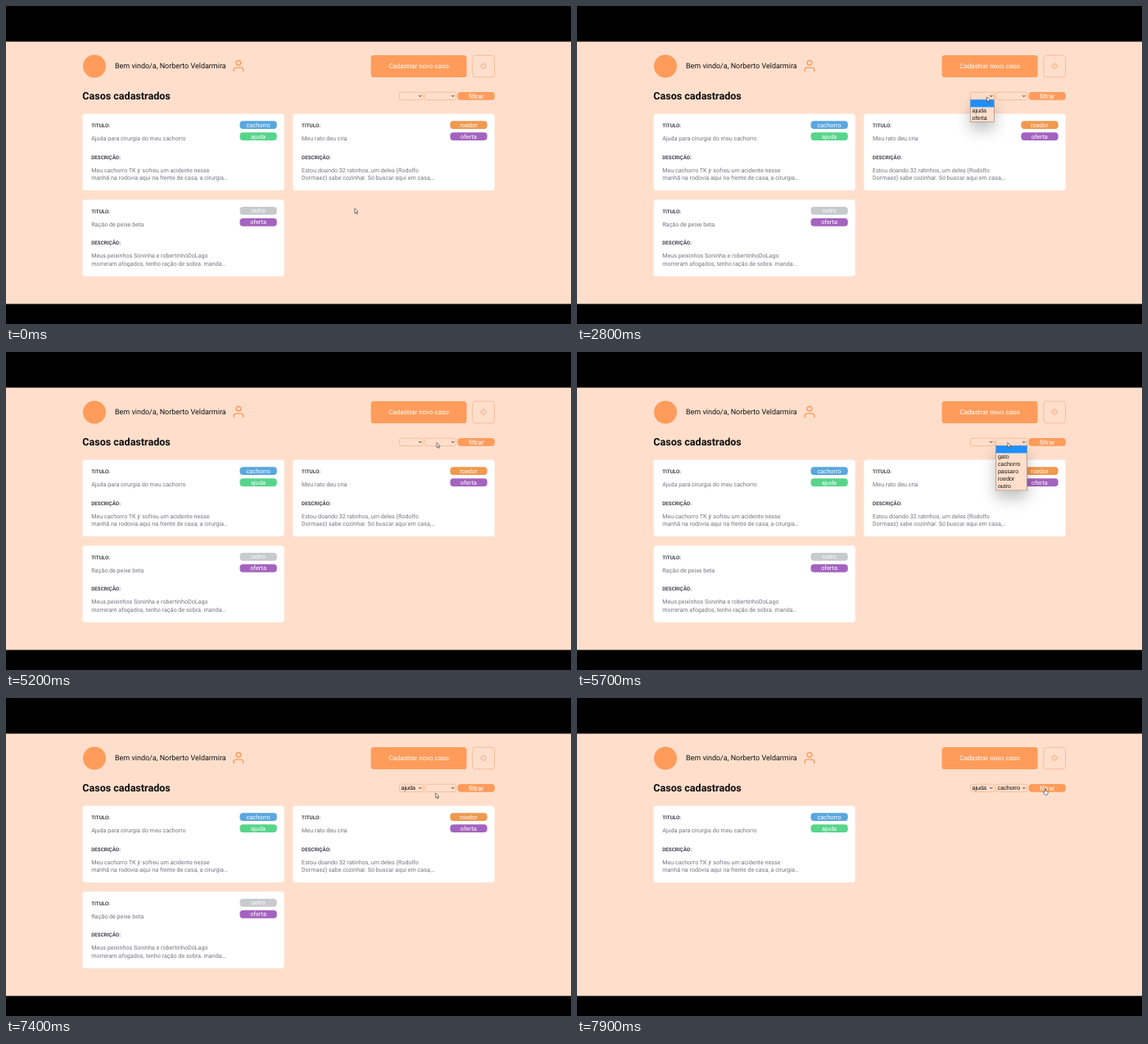
Write an HTML page that moves like this. It is 690 by 388 pixels and loops after 8000 ms.

```html
<!DOCTYPE html>
<html lang="pt-BR">
<head>
<meta charset="utf-8">
<style>
html, body { margin: 0; width: 100%; height: 100%; overflow: hidden; background: #000; }
svg { display: block; width: 100%; height: 100%; }
text { font-family: Roboto, sans-serif; text-rendering: geometricPrecision; }
.ui { font: 7.1px "Liberation Sans", Arial, sans-serif; }
</style>
</head>
<body>
<svg id="stage" viewBox="0 0 690 388">
  <defs>
    <filter id="shadow" x="-150%" y="-80%" width="400%" height="300%">
      <feDropShadow dx="0" dy="9" stdDeviation="9" flood-opacity=".25"/>
    </filter>
  </defs>
</svg>
<script>
const ORANGE = '#ff9c5b', PAGE = '#ffdfcc';
const stage = document.getElementById('stage');
const LOOP = 8000, STEP = 100;

const rect = (x, y, w, h, fill, rx = 0, extra = '') =>
  `<rect x="${x}" y="${y}" width="${w}" height="${h}" rx="${rx}" fill="${fill}" ${extra}/>`;
const text = (x, y, size, fill, str, extra = '') =>
  `<text x="${x}" y="${y}" font-size="${size}" fill="${fill}" ${extra}>${str}</text>`;
const centered = 'text-anchor="middle"';

const tagColors = {
  cachorro: '#5aa7de', ajuda: '#57d58b', roedor: '#f0994f', oferta: '#a463bf', outro: '#c9cacd'
};
const tag = (y, name) =>
  rect(192, y, 45.3, 9.7, tagColors[name], 4) +
  text(214.6, y + 7.4, 7.4, '#fff', name, centered);

const label = (y, str) => text(10.7, y, 6.27, '#41414d', str, 'font-weight="700"');
const body = (y, str) => text(10.7, y, 7.17, '#737380', str);

function card(id, x, y, title, lines, tags) {
  return `<g id="${id}" transform="translate(${x} ${y})">` +
    rect(0, 0, 246.2, 93.5, '#fff', 3.6) +
    label(16.7, 'TITULO:') + body(32.7, title) +
    label(55.1, 'DESCRIÇÃO:') + body(71.1, lines[0]) + body(80.8, lines[1]) +
    tag(8.7, tags[0]) + tag(22.7, tags[1]) + '</g>';
}

function select(id, x, w) {
  return rect(x, 105.2, w, 9.3, PAGE, 2, `stroke="${ORANGE}" stroke-width=".5"`) +
    `<text id="${id}" class="ui" x="${x + 2.1}" y="112.2"></text>` +
    `<path d="M${x + w - 5.4} 109l1.6 1.6 1.6-1.6" fill="none" stroke="#111" stroke-width=".9"/>`;
}

function menu(id, x, w, items) {
  const h = 9.1 * (items.length + 1);
  return `<g id="${id}"><g filter="url(#shadow)">` +
    rect(x, 114.3, w, h, PAGE, 0, 'stroke="#8b7d75" stroke-width=".6"') + '</g>' +
    rect(x + .3, 114.4, w - .6, 9, '#1e90ff', 0, 'class="mark"') +
    items.map((s, i) => `<text class="ui" x="${x + 2.4}" y="${130 + 9 * i}">${s}</text>`).join('') + '</g>';
}

stage.innerHTML += [
  rect(0, 43.5, 690, 320, PAGE),
  `<circle cx="108" cy="73.5" r="14" fill="${ORANGE}"/>`,
  text(133, 76.4, 8.97, '#111', 'Bem vindo/a, Norberto Veldarmira'),
  `<g transform="translate(275.3 64.3) scale(.72)" fill="none" stroke="${ORANGE}" stroke-width="2" stroke-linecap="round">
    <path d="M20 21v-2a4 4 0 0 0-4-4H8a4 4 0 0 0-4 4v2"/><circle cx="12" cy="7" r="4"/></g>`,
  rect(445.6, 60, 117, 27, ORANGE, 3.6),
  text(504, 76, 8.06, '#fff', 'Cadastrar novo caso', centered),
  rect(569.8, 60.2, 26.8, 26.6, 'none', 3.6, 'stroke="#f3ae86" stroke-width=".7"'),
  `<path transform="translate(579 68.6) scale(.34)" d="M18.4 6.6a9 9 0 1 1-12.8 0M12 2v10"
    fill="none" stroke="#ee9560" stroke-width="2.2" stroke-linecap="round"/>`,
  text(93.3, 114.1, 12.54, '#0c0c0c', 'Casos cadastrados', 'font-weight="700"'),
  select('kind', 480.4, 29.2),
  select('animal', 511.6, 38),
  rect(551.5, 105, 45.4, 9.8, ORANGE, 4),
  text(574.2, 112.6, 8, '#fff', 'filtrar', centered),
  card('card1', 93.5, 131.5, 'Ajuda para cirurgia do meu cachorro',
    ['Meu cachorro TK jr sofreu um acidente nesse', 'manhã na rodovia aqui na frente de casa, a cirurgia…'],
    ['cachorro', 'ajuda']),
  card('card2', 350.4, 131.5, 'Meu rato deu cria',
    ['Estou doando 32 ratinhos, um deles (Rodolfo', 'Dormaez) sabe cozinhar. Só buscar aqui em casa,…'],
    ['roedor', 'oferta']),
  card('card3', 93.5, 236.3, 'Ração de peixe beta',
    ['Meus peixinhos Soninha e robertinhoDoLago', 'morreram afogados, tenho ração de sobra. manda…'],
    ['outro', 'oferta']),
  menu('kinds', 480.2, 29.4, ['ajuda', 'oferta']),
  menu('animals', 511.5, 38.2, ['gato', 'cachorro', 'passaro', 'roedor', 'outro']),
  `<g id="cursor" stroke="#333" stroke-width=".65" fill="#fff" stroke-linejoin="round">
    <path id="arrow" d="M0 0v5.8l1.3-1.2 1 2.2 1.1-.5-1-2.1h1.8z"/>
    <path id="hand" d="M-.8 3.8V.5q.7-1 1.4 0v2.2q2.4 0 2.5 1.2v1.7L2.4 7.6H-.6L-2.5 4.8q.2-1 1.7-.2z"/></g>`
].join('');

const $ = id => document.getElementById(id);
const show = (id, on) => $(id).setAttribute('visibility', on ? 'inherit' : 'hidden');
const within = (t, a, b) => t >= a && t < b;

// time, x, y of the pointer tip
const path = [
  [0, 425.8, 247], [100, 444, 214], [200, 482, 138], [300, 500.5, 111],
  [4400, 500.5, 111], [4500, 502.6, 111.3], [4800, 526, 110.6],
  [6100, 526, 110.6], [6300, 537.5, 106], [6700, 503, 110],
  [7100, 503, 110], [7200, 500, 111], [7300, 492, 127], [7400, 524.7, 116],
  [7500, 525, 112], [7600, 527, 136], [7700, 550, 124], [7800, 572, 110.5], [8000, 572, 110.5]
];

function pointer(t) {
  const i = path.findIndex(p => p[0] > t);
  const [t0, x0, y0] = path[i - 1], [t1, x1, y1] = path[i];
  const k = (t - t0) / (t1 - t0);
  return [x0 + (x1 - x0) * k, y0 + (y1 - y0) * k];
}

function openMenu(id, open, row) {
  show(id, open);
  const mark = $(id).querySelector('.mark');
  mark.setAttribute('y', 114.4 + 9 * row);
  $(id).querySelectorAll('text').forEach((el, i) => el.setAttribute('fill', i + 1 === row ? '#fff' : '#111'));
}

function draw(now) {
  const t = Math.floor(now % LOOP / STEP) * STEP;
  openMenu('kinds', within(t, 500, 5000) || within(t, 7200, 7400), t === 7300 ? 1 : 0);
  openMenu('animals', within(t, 5600, 7200) || within(t, 7500, 7700), t === 7600 ? 2 : 0);
  $('kind').textContent = t >= 7400 ? 'ajuda' : '';
  $('animal').textContent = t >= 7700 ? 'cachorro' : '';
  show('card2', t < 7900);
  show('card3', t < 7900);
  show('arrow', t < 7800);
  show('hand', t >= 7800);
  $('cursor').setAttribute('transform', `translate(${pointer(t)})`);
}

const start = performance.now();
function loop() {
  draw(performance.now() - start);
  requestAnimationFrame(loop);
}
loop();
</script>
</body>
</html>
```
